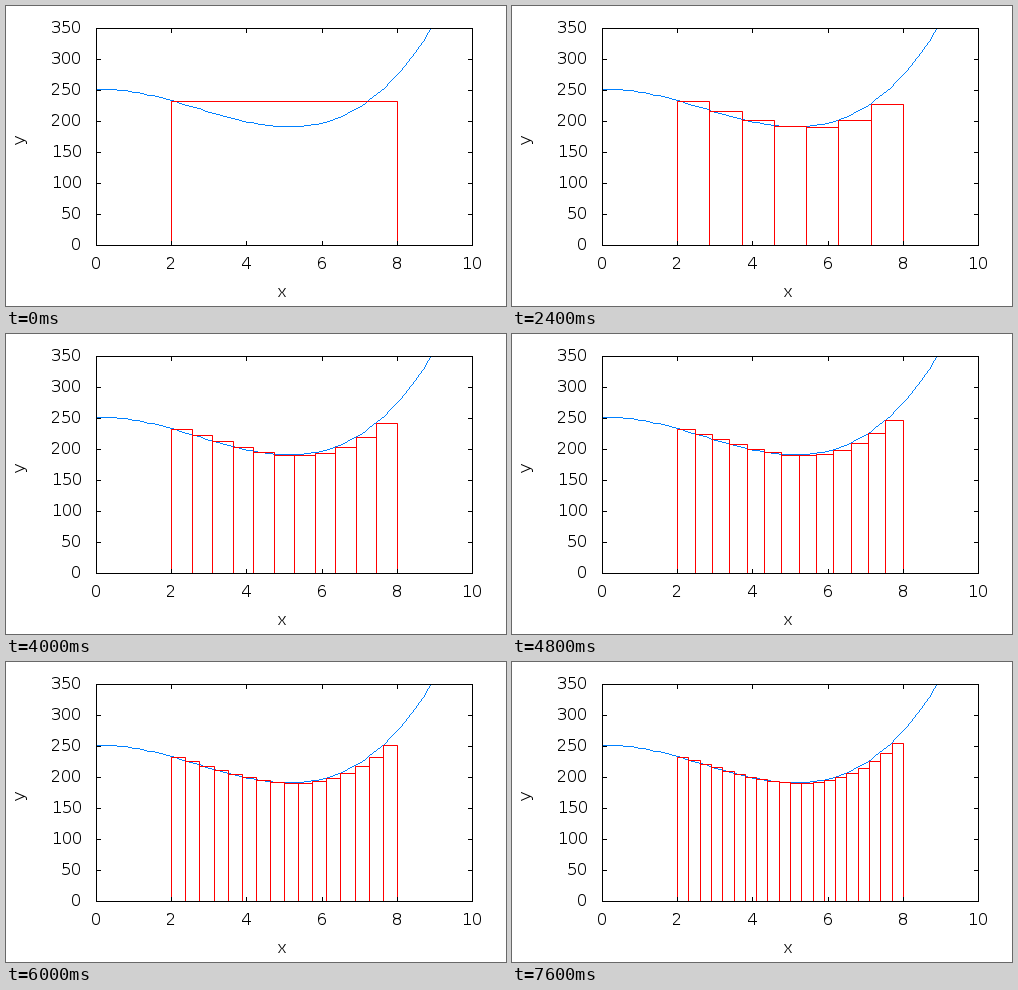
A matplotlib script that plays this animation: 500 px wide and 300 px high, repeating every 8 s.

```python
import numpy as np
import matplotlib.pyplot as plt
from matplotlib.animation import FuncAnimation

W, H, DPI = 500, 300, 100
PX = 72 / DPI  # one pixel in points
LEFT, RIGHT, TOP, BOTTOM = 90, 466, 22, 239
X_MAX, Y_MAX = 10, 350
A, B = 2, 8  # interval of the sum
STEPS = 20
TICK = 4

# Crisp, natively hinted glyphs with thin stems
plt.rcParams.update({"font.family": "DejaVu Sans",
                     "text.hinting": "default",
                     "text.hinting_factor": 1})


def f(x):
    return x**3 - 8 * x**2 + 3 * x + 250


def col(x):
    return np.floor(LEFT + x * (RIGHT - LEFT) / X_MAX + 0.5)


def row(y):
    return np.floor(BOTTOM - y * (BOTTOM - TOP) / Y_MAX + 0.5)


fig = plt.figure(figsize=(W / DPI, H / DPI), dpi=DPI, facecolor="white")
ax = fig.add_axes([0, 0, 1, 1])
ax.set_xlim(0, W)
ax.set_ylim(H, 0)
ax.axis("off")


def stroke(xs, ys, color, z):
    """Straight one-pixel lines, snapped to the pixel grid."""
    line, = ax.plot(xs, ys, color=color, lw=PX, zorder=z, snap=True,
                    solid_capstyle="projecting", solid_joinstyle="miter")
    return line


def label(x, y, text, **kw):
    style = dict(fontsize=16 * PX, ha="center", va="baseline")
    ax.text(x, y, text, color="black", **{**style, **kw})


def draw_frame():
    x0, x1, y0, y1 = col(0), col(X_MAX), row(0), row(Y_MAX)
    stroke([x0, x1, x1, x0, x0], [y0, y0, y1, y1, y0], "black", 4)
    for v in range(0, X_MAX + 1, 2):
        stroke([col(v)] * 2, [y0, y0 - TICK], "black", 4)
        stroke([col(v)] * 2, [y1, y1 + TICK], "black", 4)
        label(col(v), 263, str(v))
    for v in range(0, Y_MAX + 1, 50):
        stroke([x0, x0 + TICK], [row(v)] * 2, "black", 4)
        stroke([x1, x1 - TICK], [row(v)] * 2, "black", 4)
        label(75.5, row(v) + 5, str(v), ha="right")
    label(276, 291, "x")
    label(15, 133, "y", rotation=90, va="center")


def draw_curve():
    """Polyline through the samples, set pixel by pixel without smoothing."""
    xs = np.linspace(0, X_MAX, 100)
    xs = xs[f(xs) <= Y_MAX]
    points = np.column_stack([col(xs), row(f(xs))])
    pixels = []
    for p, q in zip(points[:-1], points[1:]):
        n = int(np.abs(q - p).max())
        pixels.append(np.floor(np.linspace(p, q, n + 1) + 0.5))
    px, py = np.unique(np.vstack(pixels), axis=0).T
    ax.plot(px, py, ",", color="#0080ff", zorder=2)


def bar_outline(n):
    """All n left-endpoint rectangles as one broken line."""
    edges = np.linspace(A, B, n + 1)
    xs, ys = [], []
    for a, b in zip(edges[:-1], edges[1:]):
        xs += [col(a), col(a), col(b), col(b), np.nan]
        ys += [row(0), row(f(a)), row(f(a)), row(0), np.nan]
    return xs, ys


draw_frame()
draw_curve()
bars = stroke([], [], "#ff0000", 3)


def update(i):
    bars.set_data(*bar_outline(i + 1))
    return [bars]


anim = FuncAnimation(fig, update, frames=STEPS, interval=400,
                     repeat=True, repeat_delay=0, blit=False)
plt.show()
```
